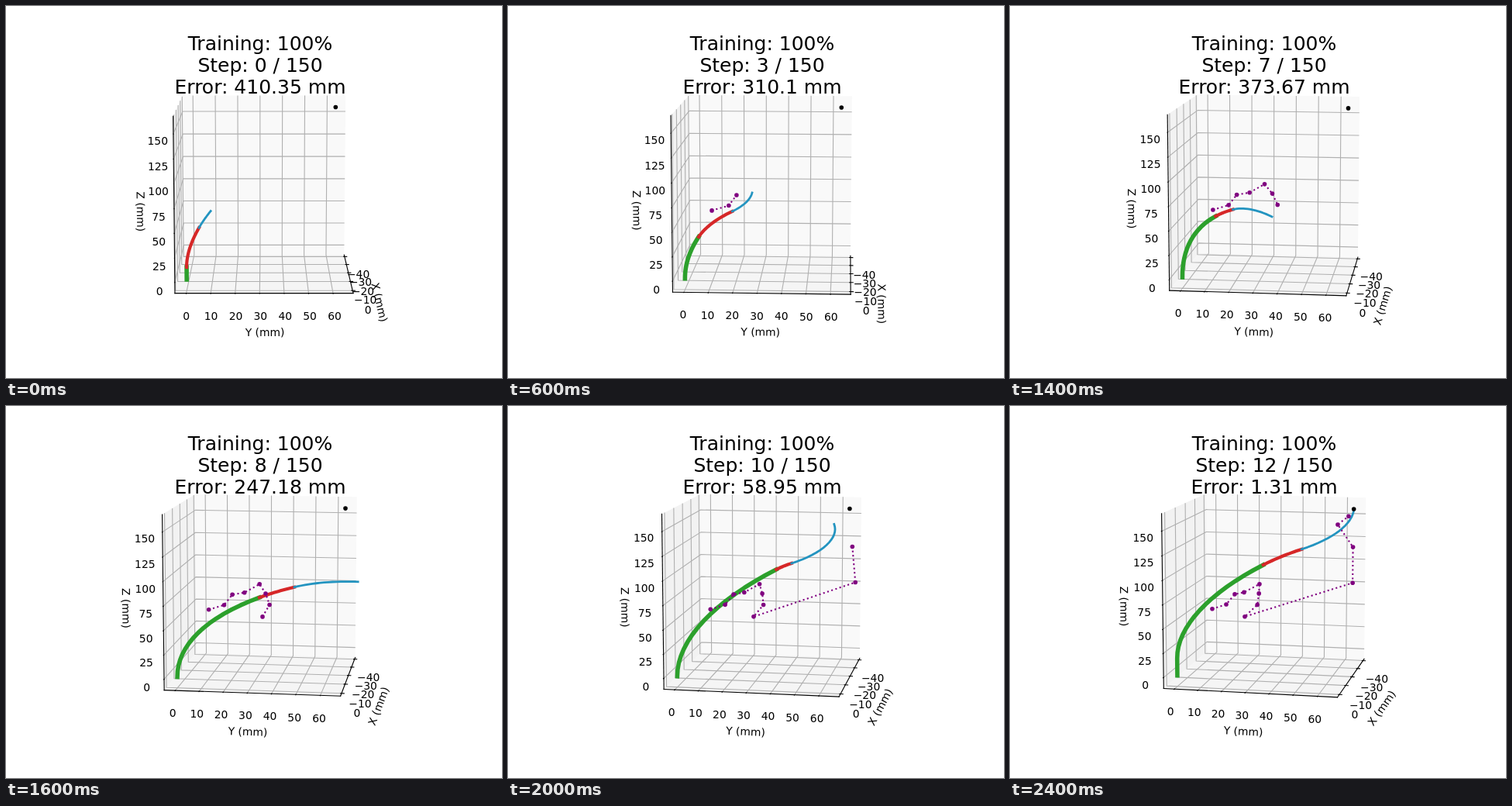
An HTML page for the animation above (2600 ms loop, 640 by 480 pixels).

```html
<!DOCTYPE html>
<html lang="en">
<head>
<meta charset="utf-8">
<title>Arm training</title>
<style>
html, body { margin: 0; width: 100%; height: 100%; overflow: hidden; background: #fff; }
svg { display: block; width: 640px; height: 480px; }
text { font-family: "DejaVu Sans", sans-serif; font-size: 13.89px; text-anchor: middle; fill: #000; }
.title text { font-size: 25px; }
path { fill: none; stroke-linejoin: round; }
.grid { stroke: #b0b0b0; stroke-width: 1.11; }
.axis { stroke: #000; stroke-width: 1.11; stroke-linecap: square; }
.tick { stroke: #000; stroke-width: 1.11; }
.arm { stroke-linecap: square; }
.outer { stroke: #2ca02c; stroke-width: 5.56; }
.middle { stroke: #d62728; stroke-width: 4.17; }
.inner { stroke: #2394c0; stroke-width: 2.78; }
.trail path { stroke: #800080; stroke-width: 2.08; stroke-dasharray: 2.08 3.44; }
.trail circle { fill: #800080; }
</style>
</head>
<body>
<svg id="stage" viewBox="0 0 640 480"></svg>
<script>
const STEP_MS = 200;
const stage = document.getElementById('stage');

// Tip of the arm at every step, in mm (x, y, z), and the error shown.
const TRACE = [
  [-14.6, 9.2, 59.4, 410.35], [-10.6, 16.9, 67.8, 372.48], [-12.2, 20, 77.7, 336.92],
  [-2.8, 27.5, 86.9, 310.1], [-4.8, 33.3, 94.5, 275.94], [16.8, 40.7, 100.5, 295.54],
  [32.9, 45.8, 101.7, 330.66], [48.3, 46.7, 102.4, 373.67], [9.7, 75.7, 109.1, 247.18],
  [-13, 70, 130.3, 131.39], [-34.8, 57.7, 141.3, 58.95], [-37.4, 61.8, 149.3, 26.62],
  [-39.3, 63.6, 156.2, 1.31]
];
const GOAL = [-39.3, 63.6, 156.2];

// Key poses: step, straight stem (mm), then both joints as
// share of the tip's reach and height (mm).
const POSES = [
  [0, 0, 0, 12.8, 0.51, 47.4],
  [3, 0, 0.207, 42.8, 0.705, 68.3],
  [5, 0, 0.286, 59.4, 0.513, 74.5],
  [7, 0, 0.41, 79.5, 0.602, 93.4],
  [9, 0, 0.525, 95.6, 0.716, 106.8],
  [10, 0, 0.619, 99, 0.718, 103.8],
  [12, 18, 0.473, 105.3, 0.692, 117.9]
];

// Camera: perspective view of a cube, turning one degree per step.
const CX = 333, CY = 237.4, SCALE = 1998, DIST = 10;
const rad = deg => deg * Math.PI / 180;
const CE = Math.cos(rad(10)), SE = Math.sin(rad(10));
const H = 0.5501;      // half of the cube
const D = 0.4801;      // half of the data range
const LABEL = 0.6646;  // distance of tick labels
const NAME = 0.7465;   // distance of axis names

function project([x, y, z], step) {
  const c = Math.cos(rad(step)), s = Math.sin(rad(step));
  const right = y * c - x * s, near = x * c + y * s;
  const depth = DIST - near * CE - z * SE;
  return [CX + SCALE * right / depth, CY - SCALE * (z * CE - near * SE) / depth];
}

const xPos = v => D + 2 * D * v / -GOAL[0];
const yPos = v => -D + 2 * D * v / GOAL[1];
const zPos = v => -D + 2 * D * v / GOAL[2];
const place = ([x, y, z]) => [xPos(x), yPos(y), zPos(z)];

const range = (from, to, by) =>
  Array.from({ length: (to - from) / by + 1 }, (_, i) => from + i * by);

function poseAt(step) {
  const i = Math.max(1, POSES.findIndex(p => p[0] >= step));
  const a = POSES[i - 1], b = POSES[i];
  const k = (step - a[0]) / (b[0] - a[0]);
  return a.map((v, j) => v + (b[j] - v) * k).slice(1);
}

// Circular arc in the bending plane; angles are measured from upright.
function arc(from, to, angle) {
  const out = to[0] - from[0], up = to[1] - from[1];
  const half = Math.atan2(out, up) - angle || 1e-6;
  const points = range(0, 16, 1).map(i => {
    const a = half * i / 16;
    const len = Math.hypot(out, up) * Math.sin(a) / Math.sin(half);
    return [from[0] + len * Math.sin(angle + a), from[1] + len * Math.cos(angle + a)];
  });
  return { points, end: angle + 2 * half };
}

// Three arcs that run smoothly into each other, all in the plane of the tip.
function armAt(step) {
  const [x, y, z] = TRACE[step], reach = Math.hypot(x, y);
  const [stem, out1, up1, out2, up2] = poseAt(step);
  const j1 = [out1 * reach, up1], j2 = [out2 * reach, up2];
  const outer = arc([0, stem], j1, 0);
  const middle = arc(j1, j2, outer.end);
  const inner = arc(j2, [reach, z], middle.end);
  const lift = ([out, up]) => place([x * out / reach, y * out / reach, up]);
  return {
    outer: [[0, 0], ...outer.points].map(lift),
    middle: middle.points.map(lift),
    inner: inner.points.map(lift)
  };
}

const fix = n => n.toFixed(2);
const pair = p => fix(p[0]) + ' ' + fix(p[1]);
const text = (s, x, y, more = '') => `<text x="${fix(x)}" y="${fix(y)}" ${more}>${s}</text>`;
const dot = p => `<circle cx="${fix(p[0])}" cy="${fix(p[1])}" r="2.8"/>`;

function draw(step) {
  const at = p => project(p, step);
  const trace = pts => 'M' + pts.map(p => pair(at(p))).join('L');
  const line = (cls, ...pts) => `<path class="${cls}" d="${trace(pts)}"/>`;
  const pane = (fill, ...pts) => `<path style="fill:${fill}" d="${trace(pts)}Z"/>`;

  function tickLabel(v, p, dx, dy) {
    const [x, y] = at(p);
    return text(String(v).replace('-', '\u2212'), x + dx, y + dy + 5.06);
  }

  function axisName(s, p, from, to) {
    const [x, y] = at(p), a = at(from), b = at(to);
    let turn = Math.atan2(b[1] - a[1], b[0] - a[0]) * 180 / Math.PI;
    if (turn > 90) turn -= 180;
    return text(s, x + 1, y + 4.2, `transform="rotate(${fix(turn)} ${pair([x + 1, y])})"`);
  }

  let out = pane('#f9f9f9', [-H, -H, -H], [-H, H, -H], [-H, H, H], [-H, -H, H])
    + pane('#f2f2f2', [-H, -H, -H], [H, -H, -H], [H, -H, H], [-H, -H, H])
    + pane('#f5f5f5', [-H, -H, -H], [H, -H, -H], [H, H, -H], [-H, H, -H]);

  let marks = '';
  const OUT = H + 0.0183, IN = H - 0.0092;
  for (const v of range(-40, 0, 10)) {
    const x = xPos(v);
    out += line('grid', [x, H, -H], [x, -H, -H], [x, -H, H]);
    marks += line('tick', [x, OUT, -H], [x, IN, -H]) + tickLabel(v, [x, LABEL, -LABEL], -3.6, 1.3);
  }
  for (const v of range(0, 60, 10)) {
    const y = yPos(v);
    out += line('grid', [H, y, -H], [-H, y, -H], [-H, y, H]);
    marks += line('tick', [OUT, y, -H], [IN, y, -H]) + tickLabel(v, [LABEL, y, -LABEL], 1.1, -0.2);
  }
  for (const v of range(0, 150, 25)) {
    const z = zPos(v);
    out += line('grid', [H, -H, z], [-H, -H, z], [-H, H, z]);
    marks += line('tick', [OUT, -H, z], [IN, -H, z]) + tickLabel(v, [LABEL, -LABEL, z], 6, 5.7);
  }

  out += line('axis', [-H, H, -H], [H, H, -H])
    + line('axis', [H, -H, -H], [H, H, -H])
    + line('axis', [H, -H, -H], [H, -H, H])
    + marks
    + axisName('X (mm)', [0, NAME, -NAME], [-H, H, -H], [H, H, -H])
    + axisName('Y (mm)', [NAME, 0, -NAME], [H, -H, -H], [H, H, -H])
    + axisName('Z (mm)', [NAME, -NAME, 0], [H, -H, H], [H, -H, -H]);

  for (const [part, points] of Object.entries(armAt(step))) {
    out += line('arm ' + part, ...points);
  }

  const past = TRACE.slice(0, step).map(place);
  if (step) {
    out += `<g class="trail">${line('', ...past)}${past.map(p => dot(at(p))).join('')}</g>`;
  }
  out += dot(at(place(GOAL)));

  const title = ['Training: 100%', `Step: ${step} / 150`, `Error: ${TRACE[step][3]} mm`];
  out += `<g class="title">${title.map((s, i) => text(s, 328, 57 + 28 * i)).join('')}</g>`;
  stage.innerHTML = out;
}

let shown = 0;
const begin = performance.now();
draw(0);

function tick() {
  const step = Math.floor(Math.max(0, performance.now() - begin) / STEP_MS) % TRACE.length;
  if (step !== shown) draw(shown = step);
  requestAnimationFrame(tick);
}
requestAnimationFrame(tick);
</script>
</body>
</html>
```
